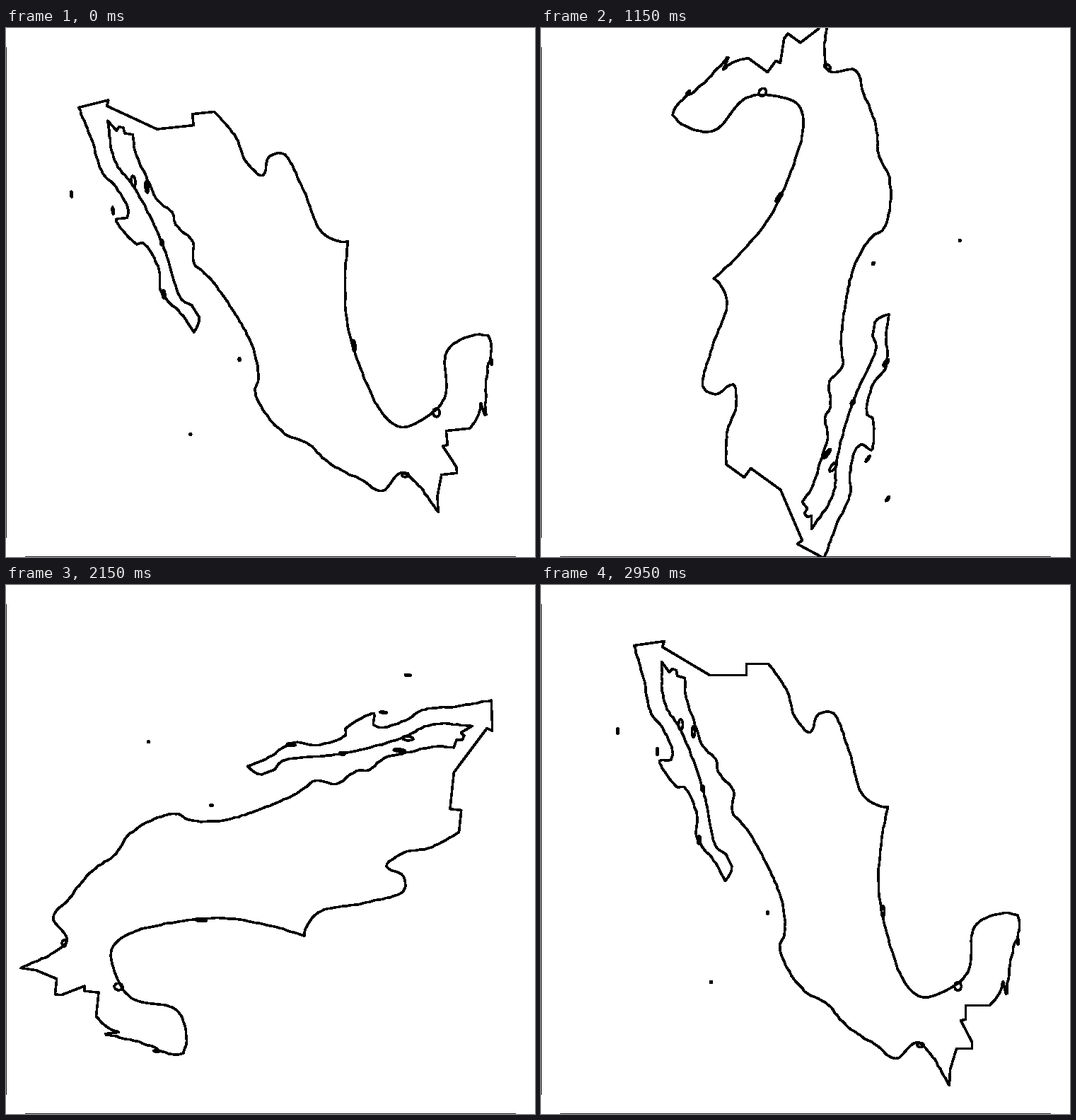
Write a matplotlib script that moves like this. It is 748 by 748 pixels and loops after 3 s.

```python
import numpy as np
import matplotlib.pyplot as plt
from matplotlib.animation import FuncAnimation
from matplotlib.patches import Rectangle

SIZE = 748
DPI = 64
FRAMES = 60
INTERVAL = 50
CENTER = (SIZE - 1) / 2
PX = 72 / DPI  # points per pixel

rng = np.random.default_rng(4)


def border(*points):
    """Straight edges."""
    return np.array(points, float)


def coast(*points, rough=.7, step=5):
    """Smooth curve through key points with a slightly ragged edge."""
    p = np.array(points, float)
    chord = np.hypot(*np.diff(p, axis=0).T)
    t = np.r_[0, np.cumsum(np.sqrt(chord))]
    slope = np.gradient(p, t, axis=0)
    parts = []
    for i, length in enumerate(chord):
        n = max(2, int(length / step))
        u = np.arange(n)[:, None] / n
        h = t[i + 1] - t[i]
        curve = ((1 + 2 * u) * (1 - u) ** 2 * p[i]
                 + u * (1 - u) ** 2 * h * slope[i]
                 + u ** 2 * (3 - 2 * u) * p[i + 1]
                 + u ** 2 * (u - 1) * h * slope[i + 1])
        curve[1:] += rng.uniform(-rough, rough, (n - 1, 2))
        parts.append(curve)
    return np.vstack(parts + [p[-1:]])


def island(x, y, rx, ry):
    a = np.linspace(0, 2 * np.pi, 9)
    return np.column_stack([x + rx * np.cos(a), y + ry * np.sin(a)])


# Key points in pixels, north up, clockwise from the north-west corner.
mainland = np.vstack([
    border((131, 85), (174, 79), (171, 87), (238, 127), (290, 127),
           (290, 111), (321, 111)),
    coast((321, 111), (348, 151), (358, 185), (380, 208), (392, 182),
          (411, 180), (436, 237), (455, 297), (481, 313), (490, 313)),
    coast((490, 313), (481, 360), (477, 430), (488, 490), (513, 560),
          (537, 582), (584, 566), (605, 542), (610, 488), (620, 475),
          (655, 463), (673, 466), rough=.5),
    coast((673, 466), (676, 482), (663, 530), (657, 578), (653, 560),
          (648, 576), (634, 594), rough=1.2),
    border((600, 594), (600, 614), (593, 615), (609, 646), (609, 655),
           (587, 655), (578, 685), (577, 707)),
    coast((577, 707), (553, 667), (531, 646), (501, 669), (475, 651),
          (434, 625), (402, 590), (376, 577), (348, 542), (337, 508),
          (343, 497), (344, 470), (336, 433), (314, 386), (291, 345),
          (270, 320), (272, 291), (250, 264), (247, 246), (229, 228),
          (216, 192), (204, 155), (203, 131)),
    border((192, 128), (191, 120), (185, 118), (181, 123), (170, 108)),
    coast((170, 108), (174, 165), (200, 211), (228, 287), (248, 371),
          (261, 380), (269, 403), (260, 418)),
    coast((260, 418), (247, 393), (220, 357), (220, 325), (202, 285),
          (193, 286), (167, 248), (183, 247), (185, 232), (169, 198),
          (155, 181), (144, 130), (131, 85)),
])

islands = [island(*spec) for spec in (
    (589, 567, 5, 6), (483, 461, 2, 8), (536, 650, 5, 3), (674, 504, 1, 4),
    (108, 206, 1, 4), (164, 235, 1, 5), (197, 197, 3, 8), (215, 207, 2, 8),
    (223, 360, 2, 6), (228, 287, 2, 4), (320, 463, 1, 2), (240, 561, 1, 1))]

shapes = [mainland] + islands


def rotate(points, degrees):
    a = np.radians(degrees)
    c, s = np.cos(a), np.sin(a)
    return CENTER + (points - CENTER) @ np.array([[c, -s], [s, c]])


fig = plt.figure(figsize=(SIZE / DPI, SIZE / DPI), dpi=DPI, facecolor="white")
ax = fig.add_axes([0, 0, 1, 1])
ax.set_xlim(-.5, SIZE - .5)
ax.set_ylim(SIZE - .5, -.5)
ax.axis("off")

# Axis lines along the left and bottom edges.
span = SIZE - 54
for x, y, w, h in ((-.5, 26.5, 1, span), (26.5, SIZE - 1.5, span, 1)):
    ax.add_patch(Rectangle((x, y), w, h, fc="#222222", lw=0,
                           antialiased=False))

lines = [ax.plot([], [], color="black", lw=2.5 * PX, antialiased=False,
                 solid_joinstyle="round", solid_capstyle="round")[0]
         for _ in shapes]


def update(i):
    for line, shape in zip(lines, shapes):
        line.set_data(*rotate(shape, 360 * (i + 1) / FRAMES).T)
    return lines


anim = FuncAnimation(fig, update, frames=FRAMES, interval=INTERVAL,
                     repeat=True, repeat_delay=0)
plt.show()
```
